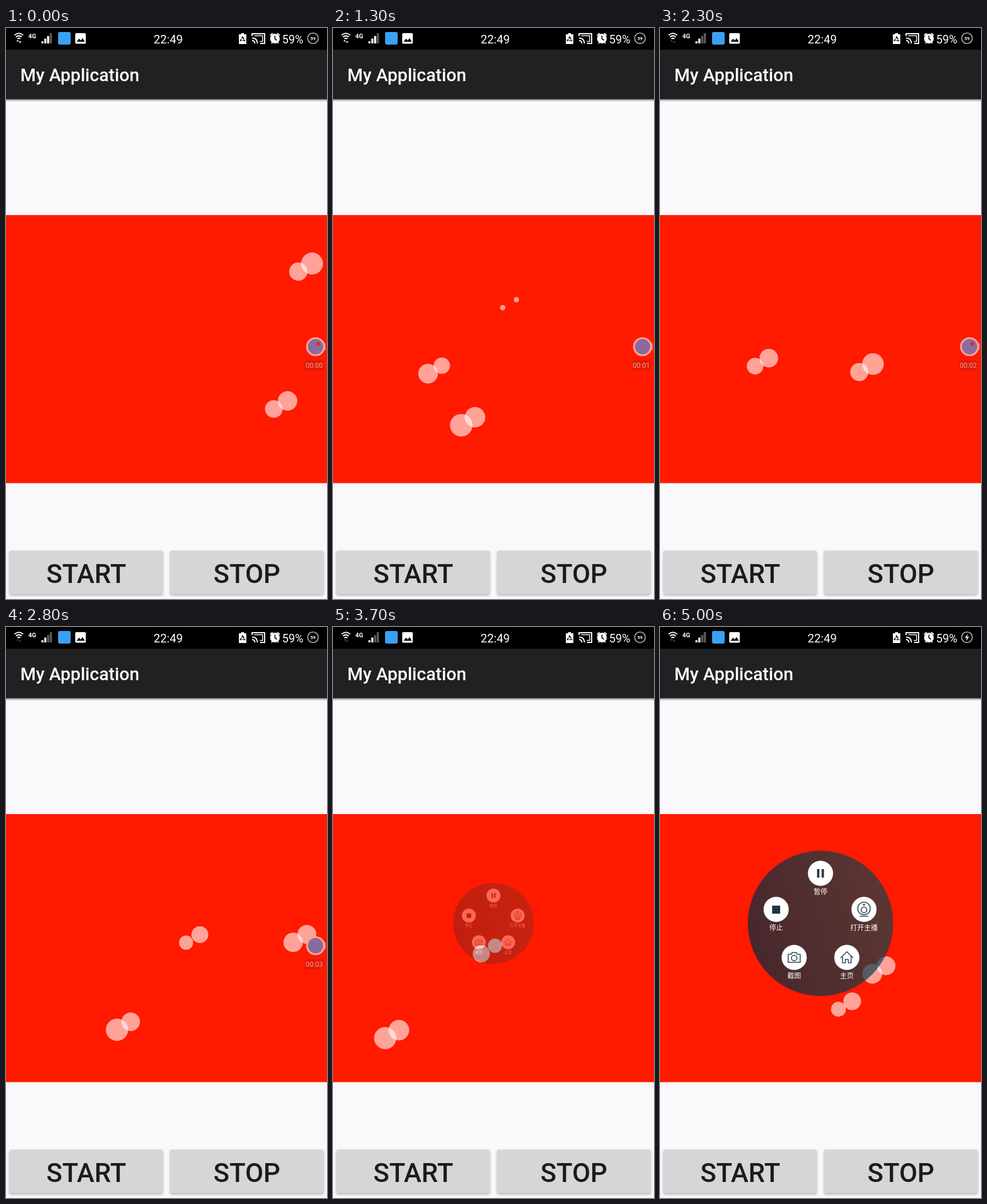
Animation of 561 by 998 pixels, one loop 5100 ms. Source, as an HTML page:

```html
<!DOCTYPE html>
<html lang="en">
<head>
<meta charset="utf-8">
<title>My Application</title>
<style>
  html, body { margin: 0; width: 100%; height: 100%; overflow: hidden; background: #faf8fb; }
  svg { display: block; width: 561px; height: 998px; }
  text { font-family: Roboto, "Noto Sans", sans-serif; }
  .mid { text-anchor: middle; }
  .label { font: 12px "Noto Sans CJK SC", "Noto Sans CJK", sans-serif; fill: #fff; text-anchor: middle; }
  .line { fill: none; stroke: #33454f; stroke-width: 1.6; stroke-linejoin: round; stroke-linecap: round; }
  .button { fill: #d7d5d8; filter: drop-shadow(0 2px 2px rgba(0, 0, 0, .3)); }
  .caption { font-size: 46.2px; font-weight: 500; fill: #1b1a1d; text-anchor: middle; }
</style>
</head>
<body>
<svg viewBox="0 0 561 998" xmlns="http://www.w3.org/2000/svg">
  <defs>
    <clipPath id="area"><rect y="327" width="561" height="469"/></clipPath>
    <linearGradient id="glass" x1="0" y1=".65" x2="1" y2=".35">
      <stop offset="0" stop-color="#002c3e" stop-opacity=".72"/>
      <stop offset="1" stop-color="#0a444c" stop-opacity=".67"/>
    </linearGradient>
    <linearGradient id="shade" x2="0" y2="1">
      <stop offset="0" stop-color="#000" stop-opacity=".45"/>
      <stop offset="1" stop-color="#000" stop-opacity="0"/>
    </linearGradient>
  </defs>

  <rect width="561" height="998" fill="#faf8fb"/>
  <rect y="124" width="561" height="5" fill="url(#shade)"/>
  <rect y="37" width="561" height="87.5" fill="#212023"/>
  <rect width="561" height="38"/>
  <text x="25" y="93" font-size="31.2" font-weight="500" fill="#fff">My Application</text>

  <!-- status bar -->
  <path d="M15 12.5Q22.5 6 30 12.5M17.5 15.8Q22.5 11.5 27.5 15.8M20 19Q22.5 16.8 25 19"
    fill="none" stroke="#fff" stroke-width="2"/>
  <path id="arrows" d="M18 23.5l2.3-3 2.3 3zM22.5 23.5h4.6l-2.3 3z" fill="#fff"/>
  <text x="39" y="18" font-size="11" font-weight="700" fill="#fff">4G</text>
  <g fill="#fff">
    <rect x="62" y="23" width="3.5" height="4"/>
    <rect x="67" y="18.5" width="3.5" height="8.5"/>
    <rect id="bar" x="71.8" y="14" width="3.7" height="13"/>
    <rect x="76.5" y="9" width="3.8" height="18" fill="#5c5c5c"/>
  </g>
  <rect x="91" y="7" width="22" height="22" rx="3" fill="#3aa0f4"/>
  <rect x="121" y="9" width="18.5" height="18.5" rx="2" fill="#fff"/>
  <path d="M123.5 24l4.2-5.5 3 3.6 3-4.6 4 6.5z"/>
  <text class="mid" x="283.5" y="27" font-size="20.5" fill="#fff">22:49</text>
  <path d="M411 9h5v2h4v17h-13V11h4z" fill="#fff"/>
  <path d="M413.5 15.5l3.8 6.5h-7.6z" fill="none" stroke="#000" stroke-width="1.7" stroke-dasharray="5 1.6"/>
  <g fill="none" stroke="#fff" stroke-width="2">
    <path d="M430 14v-4h22v17h-8M430 17.5q9 0 9.5 9.5M430 22q4.5 0 5 5"/>
    <path d="M434 13.5h14.5v10h-5" stroke-width="1.5"/>
    <circle cx="470" cy="18.5" r="7.5" fill="#fff"/>
    <path d="M461.5 13l4.5-3.8M478.5 13l-4.5-3.8M464 27l2-2.5M476 27l-2-2.5"/>
    <path d="M470 13.5v5.5l3.5 2.5" stroke="#000" stroke-width="1.6"/>
  </g>
  <text x="482.5" y="26.5" font-size="20" fill="#fff">59%</text>
  <circle cx="536.5" cy="18" r="9.3" fill="none" stroke="#bbb" stroke-width="1.6"/>
  <text id="level" class="mid" x="536.5" y="21" font-size="8" font-weight="700" fill="#fff">59</text>
  <path id="bolt" d="M538 12l-5.5 7h3.5l-1 5.5 5.5-7.5h-3.5z" fill="#ddd"/>

  <rect y="327" width="561" height="468.5" fill="#ff1a00"/>
  <g id="bubbles" clip-path="url(#area)" fill="#fff" fill-opacity=".6"></g>

  <g id="recorder">
    <rect x="522.5" y="581" width="33" height="17" rx="4" fill="#b81a10" opacity=".45"/>
    <path d="M552 557l6.5-7v14z" fill="#ef8d80"/>
    <circle cx="541" cy="557" r="15" fill="#8b6b9e" stroke="#f5a697" stroke-width="3.2"/>
    <circle id="dot" cx="545.5" cy="552" r="3" fill="#f31d12"/>
    <text id="clock" class="mid" x="538.7" y="593.5" font-size="12" fill="#f79d8e">00:00</text>
  </g>

  <g id="menu">
    <circle cx="280.5" cy="518" r="127" fill="url(#glass)"/>
    <g fill="#fff">
      <circle cx="280.5" cy="430.5" r="22"/>
      <circle cx="203" cy="493.5" r="22"/>
      <circle cx="356.5" cy="493.5" r="22"/>
      <circle cx="234.5" cy="577.5" r="22"/>
      <circle cx="326.5" cy="577.5" r="22"/>
    </g>
    <path d="M274.5 423h4v15h-4zM282.5 423h4v15h-4zM196 487h14v14h-14z" fill="#22343f"/>
    <g class="line">
      <circle cx="356.5" cy="492" r="11"/>
      <circle cx="356.5" cy="494.5" r="5"/>
      <circle cx="356.5" cy="485.5" r="1"/>
      <path d="M349.5 505.5h14"/>
      <path d="M224 572h5l2-3h7l2 3h5v14h-21z"/>
      <circle cx="234.5" cy="578.5" r="4.8"/>
      <path d="M316 578l10.5-10.5L337 578M319 576v11h5v-6h5v6h5v-11"/>
    </g>
    <text class="label" x="280.5" y="467">暂停</text>
    <text class="label" x="203" y="529.5">停止</text>
    <text class="label" x="356.5" y="529.5">打开主播</text>
    <text class="label" x="234.5" y="613.5">截图</text>
    <text class="label" x="326.5" y="613.5">主页</text>
  </g>

  <rect class="button" x="6" y="913.5" width="268" height="76" rx="3"/>
  <rect class="button" x="287" y="913.5" width="268" height="76" rx="3"/>
  <text class="caption" x="140.3" y="970">START</text>
  <text class="caption" x="421" y="970">STOP</text>
</svg>
<script>
  const LOOP = 5100, STEP = 100;
  const LIFE = 1.3, FIRST = -.8, GAP = .45;
  const CENTRE = [288, 512], MATE = [24, -14];
  const $ = id => document.getElementById(id);

  // Every GAP seconds a pair sets out from the next point towards the centre.
  const starts = [
    [756, 912], [593, 394], [399, 211], [0, 730], [205, 749], [-64, 740], [375, 641],
    [615, 572], [194, 704], [-13, 828], [550, 288], [357, 963], [408, 648]
  ];

  const bubbles = starts.flatMap((from, n) => [0, 1].map(k => {
    const node = document.createElementNS('http://www.w3.org/2000/svg', 'circle');
    $('bubbles').append(node);
    const radius = 18 + 2 * Math.sin(5 * n + 2 * k);
    return { node, from, k, radius, birth: FIRST + GAP * n };
  }));

  const show = (id, on) => $(id).setAttribute('visibility', on ? 'visible' : 'hidden');

  function moveBubble({ node, from, k, radius, birth }, t) {
    const u = (t - birth) / LIFE;
    const alive = u >= 0 && u < 1;
    const [x, y] = CENTRE.map((end, i) => from[i] + (end - from[i]) * u + MATE[i] * k);
    node.setAttribute('cx', x);
    node.setAttribute('cy', y);
    node.setAttribute('r', alive ? radius * (1 - u ** 4) : 0);
  }

  function draw(t) {
    bubbles.forEach(b => moveBubble(b, t));

    const charging = t >= 4.9 || t >= 3 && t % 1 < .5;
    show('bolt', charging);
    show('level', !charging);
    $('bar').setAttribute('fill', t < 2 ? '#fff' : '#5c5c5c');
    $('arrows').setAttribute('fill', t < 2 ? '#fff' : '#4a4a4a');

    show('recorder', t < 3.6);
    show('dot', (t + .3) % 2 < 1);
    $('clock').textContent = '00:0' + Math.floor(t + .2);

    const open = Math.min(1, Math.max(0, (t - 3.6) / .3));
    const scale = 1 - (1 - open) ** 2;
    show('menu', open > 0);
    $('menu').setAttribute('opacity', open);
    $('menu').setAttribute('transform',
      `translate(280.5 518) scale(${scale}) translate(-280.5 -518)`);
  }

  const start = performance.now();
  function tick() {
    const ms = (performance.now() - start) % LOOP;
    draw(Math.floor(ms / STEP) * STEP / 1000);
    requestAnimationFrame(tick);
  }
  tick();
</script>
</body>
</html>
```
